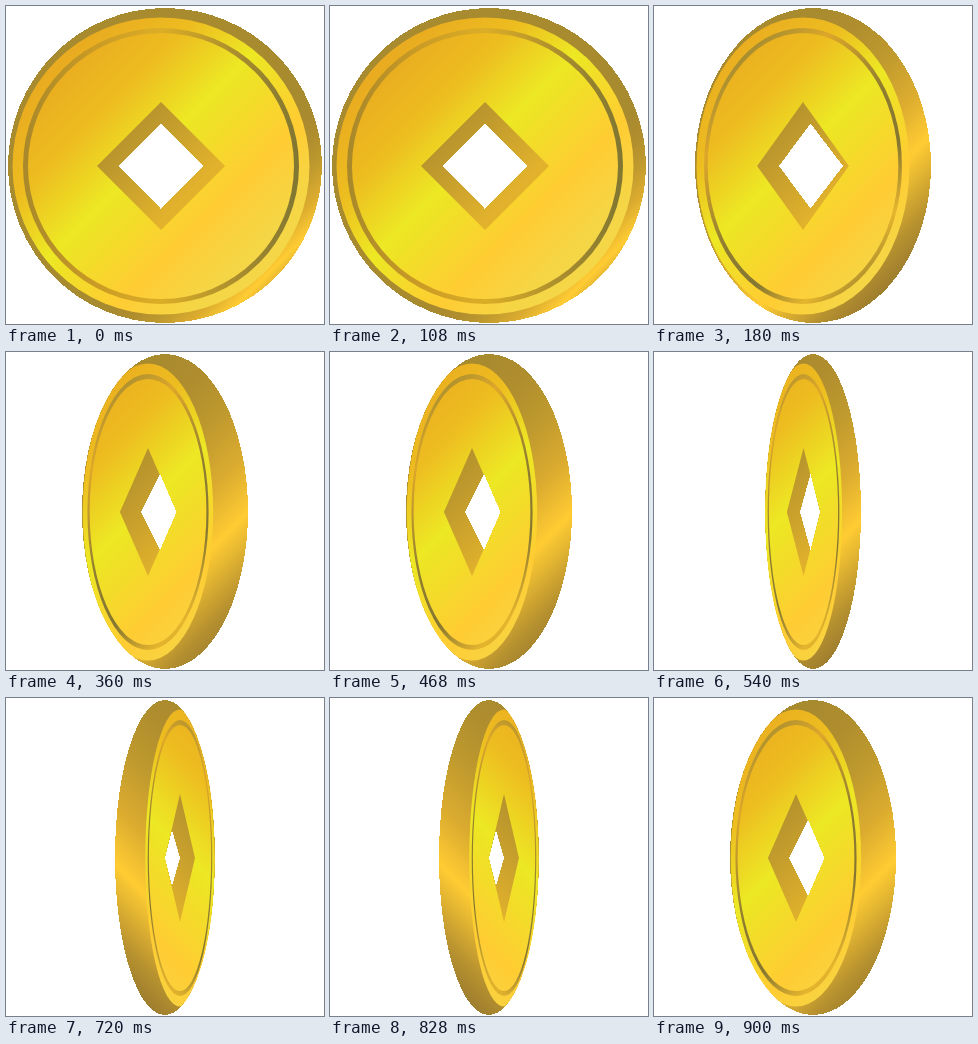
Write an HTML page that moves like this. It is 318 by 318 pixels and loops after 1080 ms.

```html
<!DOCTYPE html>
<html lang="en">
<head>
<meta charset="utf-8">
<title>Spinning coin</title>
<style>
  html, body { margin: 0; width: 318px; height: 318px; overflow: hidden; background: #fff; }
  svg { display: block; width: 1908px; height: 318px; animation: turn 1080ms steps(6) infinite; }
  .hard { shape-rendering: crispEdges; }
  @keyframes turn { to { transform: translateX(-1908px); } }
</style>
</head>
<body>
<svg id="strip" viewBox="0 0 1908 318"></svg>
<script>
  // One cell per pose: body half-width, face centre, foreshortening k,
  // hole [left, tip x, right, tip height], and where the edge catches light.
  const POSES = [
    { body: 157, cx: 155, k: 1, hole: [112.5, 155, 197.5, 43], shine: 530, spread: .5, groove: 'sides' },
    { body: 118, cx: 149, k: .717, hole: [125, 156.5, 189, 42.5], shine: 406, spread: 1, groove: 'ring' },
    { body: 83, cx: 142, k: .439, hole: [135, 154, 170.5, 38], shine: 403, spread: 1, groove: 'ring' },
    { body: 48, cx: 149.5, k: .26, hole: [146, 156.5, 166, 38], shine: 375, spread: 1, groove: 'ring' },
    { body: 50, cx: 144, k: .234, hole: [144, 152, 159, 28], shine: 375, spread: 1, groove: 'ring', flip: true }
  ];
  const ORDER = [0, 1, 2, 3, 4, 2];
  const CY = 160, RIM = 148.5, RING = 138, FACE = 133, WALL = 64;

  const ramp = stops => stops.map(([at, c]) => `<stop offset="${at}" stop-color="${c}"/>`).join('');
  // Gradient whose colour bands rise at 45 degrees, from x + y = a to x + y = b.
  const slant = (id, a, b, stops) =>
    `<linearGradient id="${id}" gradientUnits="userSpaceOnUse" x1="${a / 2}" y1="${a / 2}" x2="${b / 2}" y2="${b / 2}">${ramp(stops)}</linearGradient>`;
  const oval = (cx, cy, rx, ry, fill) =>
    `<ellipse cx="${cx}" cy="${cy}" rx="${rx}" ry="${ry}" fill="${fill}"/>`;
  const diamond = (left, tip, right, h, fill) =>
    `<path d="M${left} ${CY}L${tip} ${CY - h}L${right} ${CY}L${tip} ${CY + h}Z" fill="${fill}"/>`;

  const METAL = [[0, '#a88a2f'], [.15, '#b08e2e'], [.3, '#be992e'], [.48, '#dcac2f'], [.632, '#ffcc33'], [.82, '#b8922f'], [1, '#886d2e']];

  const shared =
    slant('face', 110, 500, [[0, '#e9ab20'], [.24, '#edbd20'], [.47, '#ede824'], [.52, '#eee325'], [.77, '#ffcc33'], [.95, '#f6d544'], [1, '#f4d646']]) +
    slant('wall', 240, 370, [[0, '#b5922d'], [.45, '#c8a02c'], [1, '#e2b22c']]) +
    slant('ring', 130, 490, [[0, '#a08a30'], [.2, '#dda72a'], [.5, '#8f7d30'], [.7, '#857630'], [.88, '#e6b52d'], [1, '#a58a2e']]) +
    `<linearGradient id="sides">${ramp([[0, '#a8882a'], [.25, '#c99a25'], [.5, '#dcae26'], [.8, '#a58a2e'], [1, '#7f7632']])}</linearGradient>`;

  function coin(p, i) {
    const { body, cx, k } = p;
    const disc = (r, fill) => oval(cx, CY, r * k, r, `url(#${fill})`);
    return `<defs>
        ${slant('metal' + i, p.shine - 240 * p.spread, p.shine + 140 * p.spread, METAL)}
        <clipPath id="edge${i}">${oval(159, 159.5, body, 157.5, '#000')}</clipPath>
      </defs>
      <g transform="translate(${i * 318})"><g${p.flip ? ' transform="matrix(-1 0 0 1 318 0)"' : ''}>
        <g class="hard">${oval(159, 159.5, body, 157.5, `url(#metal${i})`)}</g>
        <g clip-path="url(#edge${i})">
          ${disc(RIM, 'face')}${disc(RING, p.groove)}${disc(FACE, 'face')}
        </g>
        ${diamond(cx - WALL * k, cx, cx + WALL * k, WALL, 'url(#wall)')}
        <g class="hard">${diamond(...p.hole, '#fff')}</g>
      </g></g>`;
  }

  document.getElementById('strip').innerHTML =
    `<defs>${shared}</defs>` + ORDER.map((n, i) => coin(POSES[n], i)).join('');
</script>
</body>
</html>
```
